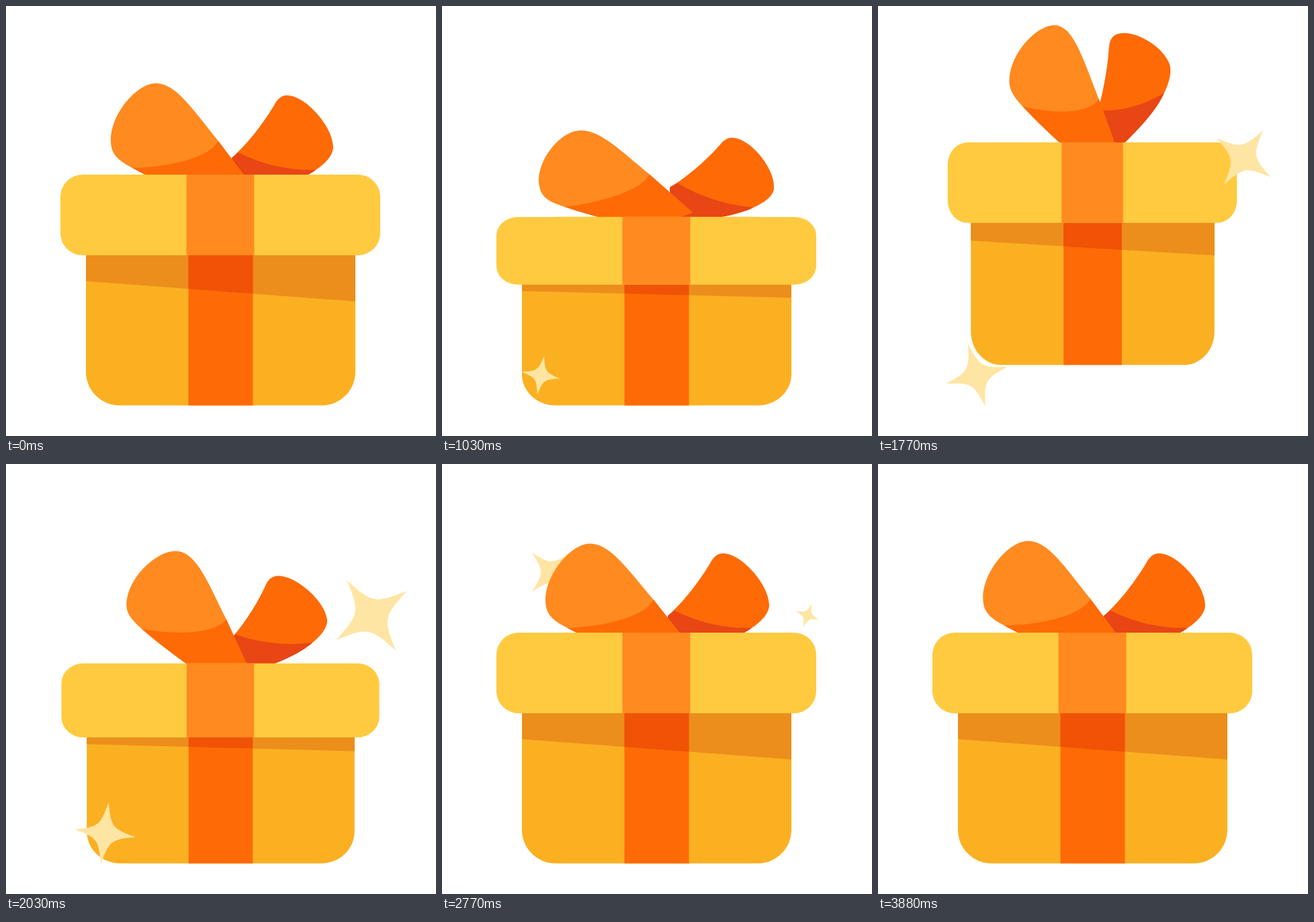
An HTML page with a canvas that plays this animation: 640 by 640 pixels, repeating every 3.99 s.

```html
<!DOCTYPE html>
<html lang="en">
<head>
<meta charset="utf-8">
<title>Gift box</title>
<style>
  html, body { margin: 0; height: 100%; overflow: hidden; background: #fff; }
  canvas { display: block; width: 100vw; height: 100vh; }
</style>
</head>
<body>
<canvas id="stage" width="640" height="640"></canvas>
<script>
const ctx = document.getElementById('stage').getContext('2d');
const LOOP = 3990, CX = 319, FLOOR = 594.5, DEG = Math.PI / 180;

const color = {
  lid: '#ffca3f', body: '#fbb022', bodyShade: '#ec8e1b',
  light: '#ff8a20', mid: '#fe6a06', ribbonShade: '#f05305',
  dark: '#e84614', star: '#ffe5a3'
};

// Smooth step from 0 at a to 1 at b
function ease(t, a, b) {
  const p = Math.min(1, Math.max(0, (t - a) / (b - a)));
  return p * p * (3 - 2 * p);
}
const hump = (t, a, peak, b) => ease(t, a, peak) * (1 - ease(t, peak, b));

// Straight lines through a few [time, value] points
function track(points, t) {
  const i = points.findIndex(p => p[0] > t);
  if (i < 1) return 0;
  const [t0, a] = points[i - 1], [t1, b] = points[i];
  return a + (b - a) * (t - t0) / (t1 - t0);
}

// Crouch, jump, fall freely, squash on landing
function boxPose(t) {
  const apex = 1580, fall = 273;
  const jump = t < apex
    ? ease(t, 1030, apex)
    : Math.max(0, 1 - ((t - apex) / fall) ** 2);
  const base = FLOOR - 118 * jump;
  const sx = 1 - 0.112 * (ease(t, 1030, 1430) - ease(t, 1670, 2090))
    + 0.038 * hump(t, 2060, 2250, 2500);
  const squash = 0.08 * (hump(t, 630, 1010, 1800) + hump(t, 1860, 2200, 2560));
  const drop = 26 * hump(t, 630, 1030, 1440) + 28 * hump(t, 1500, 2100, 2560);
  const sy = 1 - squash;
  const bottom = base - 223.5 * sy + drop;
  const lidH = 120 * (1 - 2 * squash);
  return { base, sx, sy, drop, bottom, lidH, top: bottom - lidH, depth: 38.5 * sy - drop };
}

// The loops lag behind the box: they sag on the way up and rise in the fall
function bowPose(t) {
  const sag = ease(t, 700, 1030) * (1 - ease(t, 1480, 1700));
  const s = Math.max(0, t - 2400);
  const wiggle = 0.5 * Math.exp(-s / 400) * Math.sin(Math.PI * s / 430);
  return {
    sag,
    left: ease(t, 1480, 1770) - ease(t, 1920, 2400) - 0.54 * sag - wiggle,
    right: hump(t, 1480, 1770, 2160) - 0.3 * hump(t, 700, 1060, 1400)
  };
}

const stars = {
  low: { x: 147, y: 549.5, upright: 915, spin: 0.087,
    size: [[800, 0], [1030, 29], [1430, 41], [1880, 50], [2030, 46], [2400, 0]] },
  right: { x: 544, y: 225.5, upright: 1290, spin: 0.0745,
    size: [[1170, 0], [1430, 41], [1770, 50], [2030, 64], [2240, 68], [2770, 19], [2800, 0]] },
  back: { x: 163, y: 161, upright: 2208, spin: 0.08,
    size: [[2020, 0], [2500, 44], [2770, 41], [3200, 0]] }
};

function fill(style, path) {
  ctx.fillStyle = style;
  ctx.fill(path instanceof Path2D ? path : new Path2D(path));
}

// One loop, turned and stretched about its knot
function drawLoop(knot, turn, lift, drop, base, shadow, outline, shade) {
  ctx.save();
  ctx.translate(knot, 0);
  ctx.scale(1 - 0.06 * lift, 1 + 0.08 * lift - 0.003 * drop);
  ctx.rotate(turn * lift * DEG);
  ctx.translate(-knot, 0);
  fill(base, outline);
  fill(shadow, shade);
  ctx.restore();
}

function drawBow(t, { sx, top, drop }) {
  const { sag, left, right } = bowPose(t);
  ctx.save();
  ctx.translate(CX, top - 15 * sag - 0.35 * drop);
  ctx.scale(sx, 1);

  const foot = 'C120 9 84 21 23 34 L17 -25Z';
  drawLoop(0, -25, right, drop, color.mid, color.dark,
    'M17 -25C41 -46 66 -79 81 -105C86 -114 92 -118 99 -118' +
    'C127 -118 168 -71 168 -41C168 -29 156 -16 142 -7' + foot,
    'M27 -33C62 -15 102 -6 142 -7' + foot);

  const knot = 'L51 22L-19 42Q-95 10 -131 -10';
  drawLoop(36, 13, left, drop, color.light, color.mid,
    'M-131 -10C-151 -21 -163 -29 -163 -51C-163 -91 -124 -136 -96 -136' +
    'C-66 -136 -41 -97 -3 -50' + knot,
    'M-131 -10C-79 -11 -17 -24 -3 -50' + knot);
  ctx.restore();
}

function drawBox({ base, sx, sy, top, bottom, lidH, depth }) {
  const mid = CX + 0.5, half = 200.5 * sx, ribbon = 48 * sx;

  const slab = (style, cx, w, y0, y1, rx, ry) => {
    const path = new Path2D();
    path.roundRect(cx - w, y0, 2 * w, y1 - y0, { x: rx, y: ry });
    fill(style, path);
  };

  // Slanted shadow of the lid over a strip of half-width w
  const shade = (style, w) => {
    const edge = x => bottom + depth + (0.69 * depth + 3.6) * (x + half) / (2 * half);
    fill(style, `M${mid - w} ${bottom - 2}H${mid + w}V${edge(w)}L${mid - w} ${edge(-w)}Z`);
  };

  slab(color.body, mid, half, base - 305 * sy, base, 50 * sx, 50 * sy);
  shade(color.bodyShade, half);
  slab(color.mid, mid, ribbon, bottom - 2, base, 0, 0);
  shade(color.ribbonShade, ribbon);
  slab(color.lid, CX, 238 * sx, top, bottom, 33 * sx, 0.275 * lidH);
  slab(color.light, CX, 50.5 * sx, top, bottom, 0, 0);
}

function drawStar({ x, y, upright, spin, size }, t) {
  const r = track(size, t);
  if (r <= 0) return;
  const path = new Path2D();
  path.moveTo(1, 0);
  for (let i = 0; i < 4; i++) {
    const c = Math.cos(i * 90 * DEG), s = Math.sin(i * 90 * DEG);
    const turn = (px, py) => [px * c - py * s, px * s + py * c];
    path.bezierCurveTo(...turn(0.225, 0.178), ...turn(0.178, 0.225), ...turn(0, 1));
  }
  ctx.save();
  ctx.translate(x, y);
  ctx.rotate((t - upright) * spin * DEG);
  ctx.scale(r, r);
  fill(color.star, path);
  ctx.restore();
}

function draw(t) {
  const box = boxPose(t);
  ctx.clearRect(0, 0, 640, 640);
  drawStar(stars.back, t);
  drawBow(t, box);
  drawBox(box);
  drawStar(stars.low, t);
  drawStar(stars.right, t);
}

const start = performance.now();
function tick() {
  draw((performance.now() - start) % LOOP);
  requestAnimationFrame(tick);
}
tick();
</script>
</body>
</html>
```
